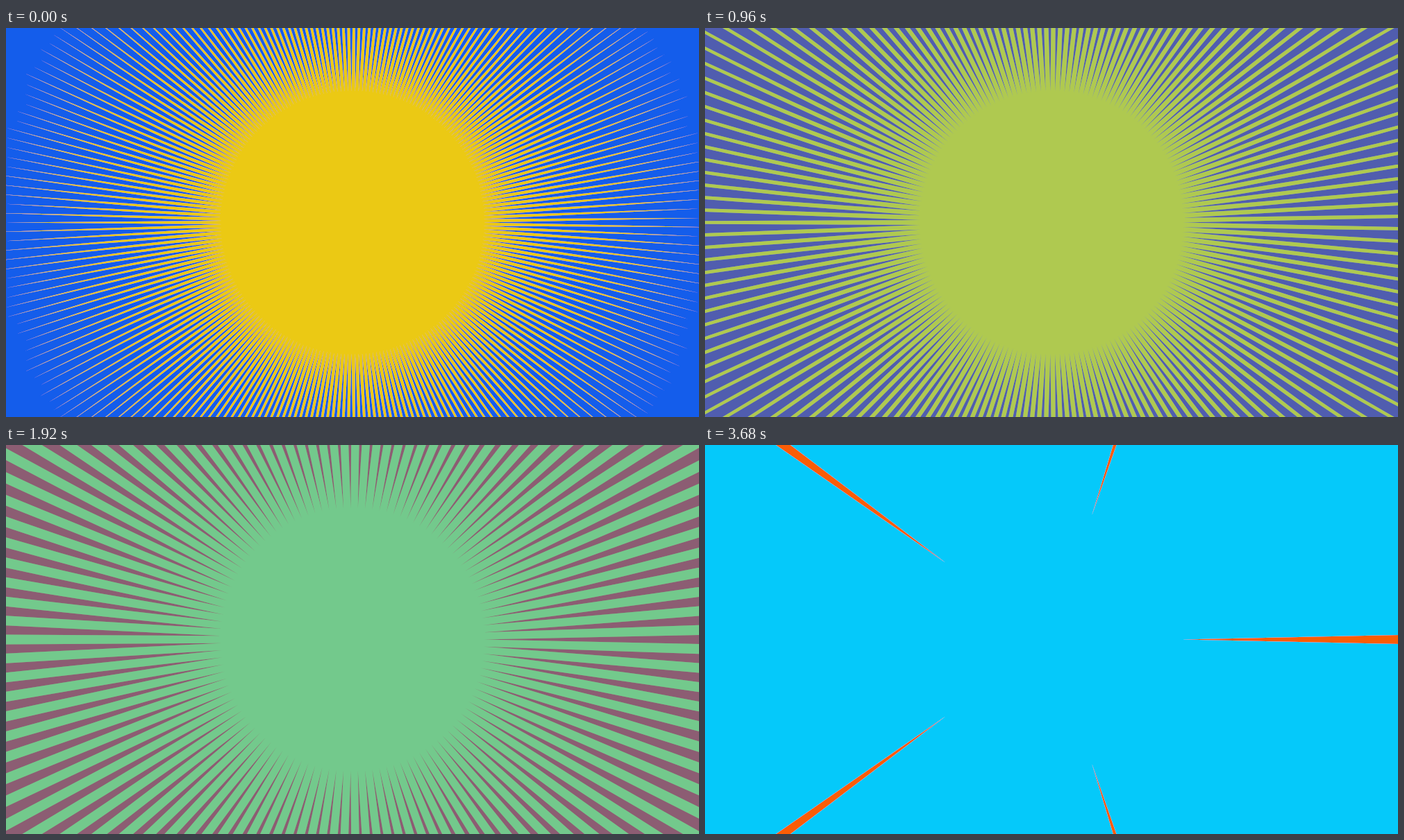
These frames come from a looping animation (998 px wide and 561 px high, 3760 ms). An HTML page with a canvas:

```html
<!DOCTYPE html>
<html lang="en">
<head>
<meta charset="utf-8">
<title>Sunburst</title>
<style>
  html, body { margin: 0; width: 100%; height: 100%; overflow: hidden; }
  canvas { display: block; }
</style>
</head>
<body>
<canvas id="stage" width="998" height="561"></canvas>
<script>
const W = 998, H = 561;
const STEP = 80, STEPS = 47;
const TIP = 189, REACH = 640, SPREAD = 0.0425;
const ctx = document.getElementById('stage').getContext('2d', { willReadFrequently: true });

const toLinear = v => v <= 0.04045 ? v / 12.92 : ((v + 0.055) / 1.055) ** 2.4;
const toSrgb = v => v <= 0.0031308 ? v * 12.92 : 1.055 * v ** (1 / 2.4) - 0.055;

// Blend two colours in linear light, so soft edges stay bright.
function mix(a, b, p) {
  return a.map((v, i) => {
    const from = toLinear(v / 255), to = toLinear(b[i] / 255);
    return Math.round(255 * toSrgb(from + (to - from) * p));
  });
}

// White spikes on black: the grey level is the coverage.
function drawSpikes(count) {
  const half = SPREAD * (REACH - TIP) / 2;
  ctx.fillStyle = '#000';
  ctx.fillRect(0, 0, W, H);
  ctx.beginPath();
  for (let i = 0; i < count; i++) {
    const angle = i * 2 * Math.PI / count;
    const cos = Math.cos(angle), sin = Math.sin(angle);
    const point = (r, side) => [W / 2 + r * cos - side * sin, H / 2 + r * sin + side * cos];
    ctx.moveTo(...point(TIP, 0));
    ctx.lineTo(...point(REACH, -half));
    ctx.lineTo(...point(REACH, half));
    ctx.closePath();
  }
  ctx.fillStyle = '#fff';
  ctx.fill();
}

function tint(field, spike) {
  const ramp = Array.from({ length: 256 }, (_, i) => mix(field, spike, i / 255));
  const image = ctx.getImageData(0, 0, W, H), px = image.data;
  for (let i = 0; i < px.length; i += 4) {
    const color = ramp[px[i]];
    px[i] = color[0];
    px[i + 1] = color[1];
    px[i + 2] = color[2];
  }
  ctx.putImageData(image, 0, 0);
}

// The number of spikes also sets both colours.
function draw(step) {
  const count = 5 * (STEPS - step);
  drawSpikes(count);
  tint([count, 201, 255 - count], [255 - count, 93, count]);
}

const start = performance.now();
let shown = -1;

function tick() {
  const step = Math.floor((performance.now() - start) / STEP) % STEPS;
  if (step !== shown) draw(shown = step);
  requestAnimationFrame(tick);
}
tick();
</script>
</body>
</html>
```
